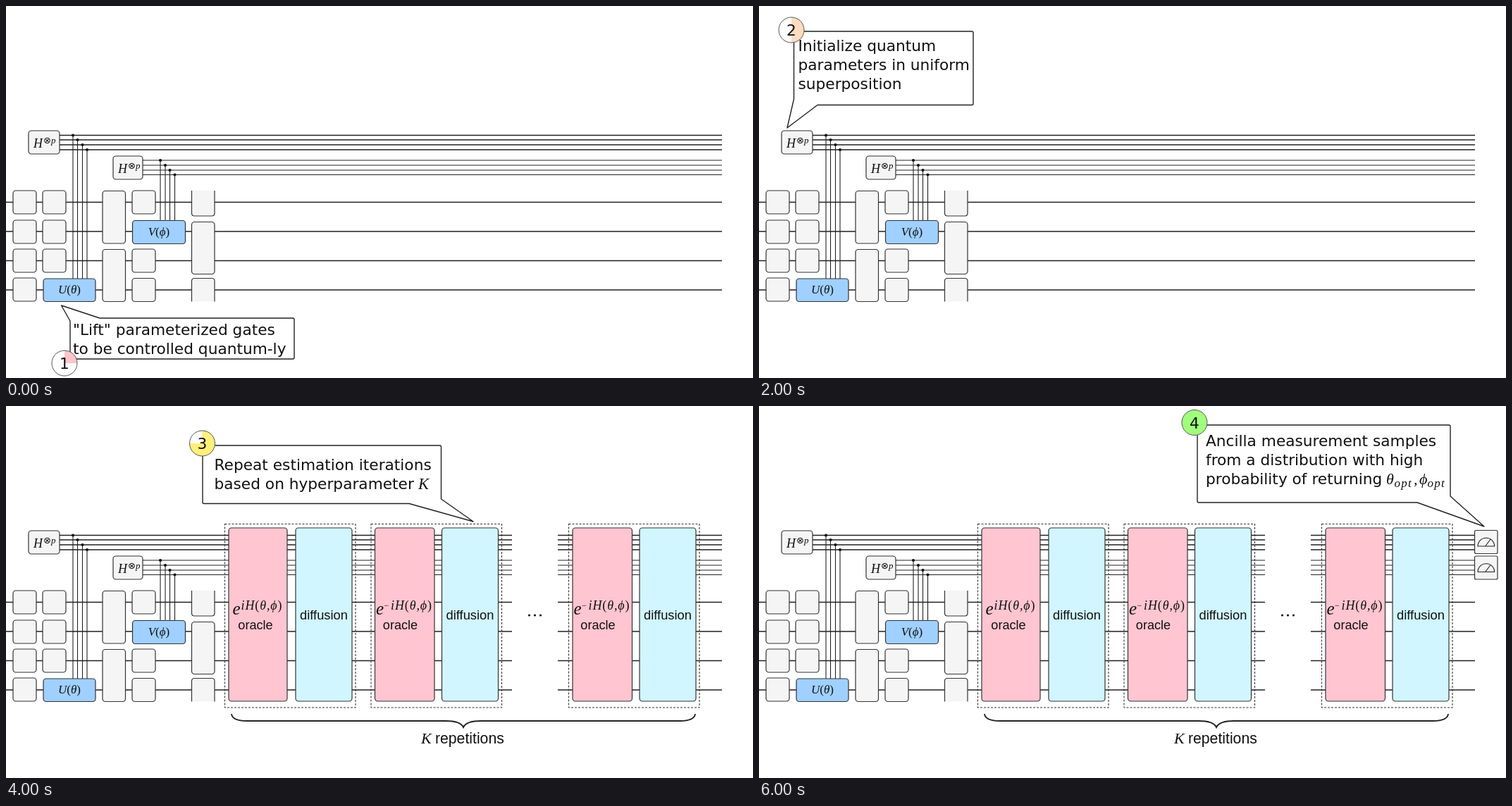
Recreate the animation shown at these times as an HTML page. Size 1060 px wide and 528 px high, loop 8 s.

```html
<!DOCTYPE html>
<html lang="en">
<head>
<meta charset="utf-8">
<title>Quantum parameter circuit</title>
<style>
  html, body { margin: 0; width: 100%; height: 100%; overflow: hidden; background: #fff; }
  svg { display: block; width: 100vw; height: 100vh; }
  text { fill: #111; white-space: pre; }
  .note { font: 21.7px "DejaVu Sans", sans-serif; }
  .sans { font-family: "Liberation Sans", sans-serif; }
  .math { font-family: "Liberation Serif", "DejaVu Sans", serif; font-style: italic; }
  .up { font-style: normal; }
  .wire, .brace { fill: none; stroke: #222; }
  .wire { stroke-width: 1.4; }
  .thin { stroke-width: 1.1; }
  .gate { stroke: #333; stroke-width: 1.2; }
  .bubble { fill: #fff; stroke: #222; stroke-width: 1.4; stroke-linejoin: round; }
  .frame { fill: none; stroke: #333; stroke-width: 1.1; stroke-dasharray: 3 2; }
</style>
</head>
<body>
<svg id="stage" viewBox="0 0 1060 528"></svg>
<script>
const STEP = 2000, STEPS = 4;
const GRAY = '#f5f5f5', BLUE = '#9fd0ff', PINK = '#ffc5d1', CYAN = '#d1f6ff';
const UPPER = [183.5, 190, 197, 204], LOWER = [219, 226, 233, 239.5], MAIN = [278.5, 320, 361.5, 403];

const path = (d, cls) => `<path d="${d}" class="${cls}"/>`;
const text = (x, y, size, cls, str, anchor = 'start') =>
  `<text x="${x}" y="${y}" class="${cls}" ${size ? `font-size="${size}"` : ''} text-anchor="${anchor}">${str}</text>`;
const up = s => `<tspan class="up">${s}</tspan>`;
const gate = (x, y, w = 33, h = 33, fill = GRAY, r = 4) =>
  `<rect x="${x}" y="${y}" width="${w}" height="${h}" rx="${r}" fill="${fill}" class="gate"/>`;
const wires = (ys, from, to, cls = 'wire') => path(ys.map(y => `M${from} ${y}H${to}`).join(''), cls);

const openGate = (y, h, edge) =>
  `<path d="M263.5 ${y}v${edge * h}q0 ${edge * 4} 4 ${edge * 4}h24.5q4 0 4 ${-edge * 4}v${-edge * h}" fill="${GRAY}" class="gate"/>`;

function controls(xs, ys, bottom) {
  return xs.map((x, i) => path(`M${x} ${ys[i]}V${bottom}`, 'wire thin') +
    `<circle cx="${x}" cy="${ys[i]}" r="2.1" fill="#111"/>`).join('');
}

function hadamard(x, y, w) {
  return gate(x, y, w, 33) + text(x + 7, y + 23.5, 18, 'math', 'H') +
    text(x + 21, y + 17.5, 13, 'math', up('⊗') + 'p');
}

function circuit() {
  const columns = [10, 52].flatMap((x, i) => [262, 304, 345, 386].slice(0, 4 - i).map(y => gate(x, y)));
  return wires(UPPER, 76, 1016) + wires(LOWER, 194, 1016, 'wire thin') + wires(MAIN, 0, 1016) +
    columns.join('') +
    gate(137, 262.5, 32.5, 74.5) + gate(137, 345.5, 32.5, 74) +
    [262, 345, 386.5].map(y => gate(179, y)).join('') +
    gate(263.5, 306.5, 32.5, 74) + openGate(262, 32, 1) + openGate(419.5, 29, -1) +
    hadamard(32, 177, 44) + hadamard(152, 213, 42) +
    controls([95, 101.5, 108.5, 115], UPPER, 387) + controls([219, 226, 232.5, 239.5], LOWER, 305) +
    gate(53, 387, 74, 32.5, BLUE) + text(90, 407.5, 17, 'math', `U${up('(')}θ${up(')')}`, 'middle') +
    gate(179.5, 304.5, 75, 33, BLUE) + text(217, 326, 17, 'math', `V${up('(')}ϕ${up(')')}`, 'middle');
}

function iteration(x, sign) {
  const power = `iH${up('(')}θ,ϕ${up(')')}`;
  const shift = sign ? 2 : 6;
  return gate(x + 6, 173, sign ? 84.5 : 83, 246, PINK) + gate(x + 101, 173, 80, 246, CYAN) +
    `<rect x="${x + .5}" y="167.5" width="185.5" height="260.5" class="frame"/>` +
    text(x + shift + 5.5, 296, 25, 'math', 'e') +
    (sign ? text(x + 19, 287, 12, 'math up', '−') : '') +
    `<g letter-spacing=".9">${text(x + (sign ? 28.5 : 23.5), 289, 18, 'math', power)}</g>` +
    text(x + (sign ? 42 : 44), 317, 18.1, 'sans', 'oracle', 'middle') +
    text(x + 141, 303, 18.3, 'sans', 'diffusion', 'middle');
}

function iterations() {
  return '<rect x="718" y="178" width="65" height="232" fill="#fff"/>' +
    iteration(310, false) + iteration(517.5, true) + iteration(798, true) +
    [742.5, 750.5, 758.5].map(x => `<circle cx="${x}" cy="297" r="1.6" fill="#111"/>`).join('') +
    `<path d="M320 437Q321 447 342 447H624Q645 447 649 456Q653 447 674 447H956Q977 447 978 437" class="brace" stroke-width="1.9"/>` +
    text(589, 479, 22, 'math', 'K') + text(609, 479, 21.2, 'sans', 'repetitions');
}

function meter(y) {
  return gate(1015.5, y, 32.5, 33, GRAY, 2) +
    path(`M1020 ${y + 22.5}a11.8 11.8 0 0 1 23.6 0zM1031 ${y + 22}l7.5 -10`, 'wire thin');
}

// The badge fills by a quarter turn for each step, clockwise from the top.
function badge(n, x, y, color) {
  const r = 18, a = n * Math.PI / 2;
  const pie = n === 4
    ? `<circle cx="${x}" cy="${y}" r="${r}" fill="${color}"/>`
    : `<path d="M${x} ${y}v${-r}A${r} ${r} 0 ${+(n > 2)} 1 ${x + r * Math.sin(a)} ${y - r * Math.cos(a)}z" fill="${color}"/>`;
  return `<circle cx="${x}" cy="${y}" r="${r}" fill="#fff"/>${pie}` +
    `<circle cx="${x}" cy="${y}" r="${r}" fill="none" stroke="#555"/>` + text(x, y + 8, 0, 'note', n, 'middle');
}

function callout(n, outline, [bx, by], color, [tx, ty], lines) {
  return path(outline, 'bubble') + badge(n, bx, by, color) +
    lines.map((line, i) => text(tx, ty + 27.1 * i, 0, 'note', line)).join('');
}

const optimum = (x, symbol) => text(x, 111, 22, 'math', symbol) +
  `<g letter-spacing="1.2">${text(x + 11.5, 115, 17, 'math', 'opt')}</g>`;

// Each layer: first step, step after the last, markup.
const layers = [
  [0, 4, circuit()],
  [2, 4, iterations()],
  [3, 4, meter(176.5) + meter(213)],
  [0, 1, callout(1, 'M133 443H407q2 0 2 2V499q0 2 -2 2H93q-2 0 -2 -2V447L78.5 425z',
    [83, 507], '#ffc4c8', [95, 467], ['"Lift" parameterized gates', 'to be controlled quantum-ly'])],
  [1, 2, callout(2, 'M49.5 132V38q0 -2 2 -2H302q2 0 2 2V138.500q0 2 -2 2H83L40 173z',
    [46, 34], '#ffdcc0', [55.5, 64], ['Initialize quantum', 'parameters in uniform', 'superposition'])],
  [2, 3, callout(3, 'M617.500 132V58q0 -2 -2 -2H281q-2 0 -2 2V136.500q0 2 2 2H572L663 164z',
    [278.5, 53], '#fff07c', [295.5, 91], ['Repeat estimation iterations', 'based on hyperparameter']) +
    text(585, 118, 22.5, 'math', 'K')],
  [3, 4, callout(4, 'M981 128V29q0 -2 -2 -2H624q-2 0 -2 2V135q0 2 2 2H934L1029 171z',
    [618, 23.5], '#a1ff7e', [634, 57],
    ['Ancilla measurement samples', 'from a distribution with high', 'probability of returning']) +
    optimum(890, 'θ') + text(929, 111, 22, 'math', ',') + optimum(937, 'ϕ')]
];

const stage = document.getElementById('stage');
stage.innerHTML = layers.map(layer => `<g>${layer[2]}</g>`).join('');

layers.forEach(([from, to], i) => {
  const frames = Array.from({ length: STEPS + 1 }, (_, s) => ({
    offset: s / STEPS,
    opacity: s % STEPS >= from && s % STEPS < to ? 1 : 0,
    easing: 'steps(1, end)'
  }));
  stage.children[i].animate(frames, { duration: STEP * STEPS, iterations: Infinity }).startTime = 0;
});
</script>
</body>
</html>
```
